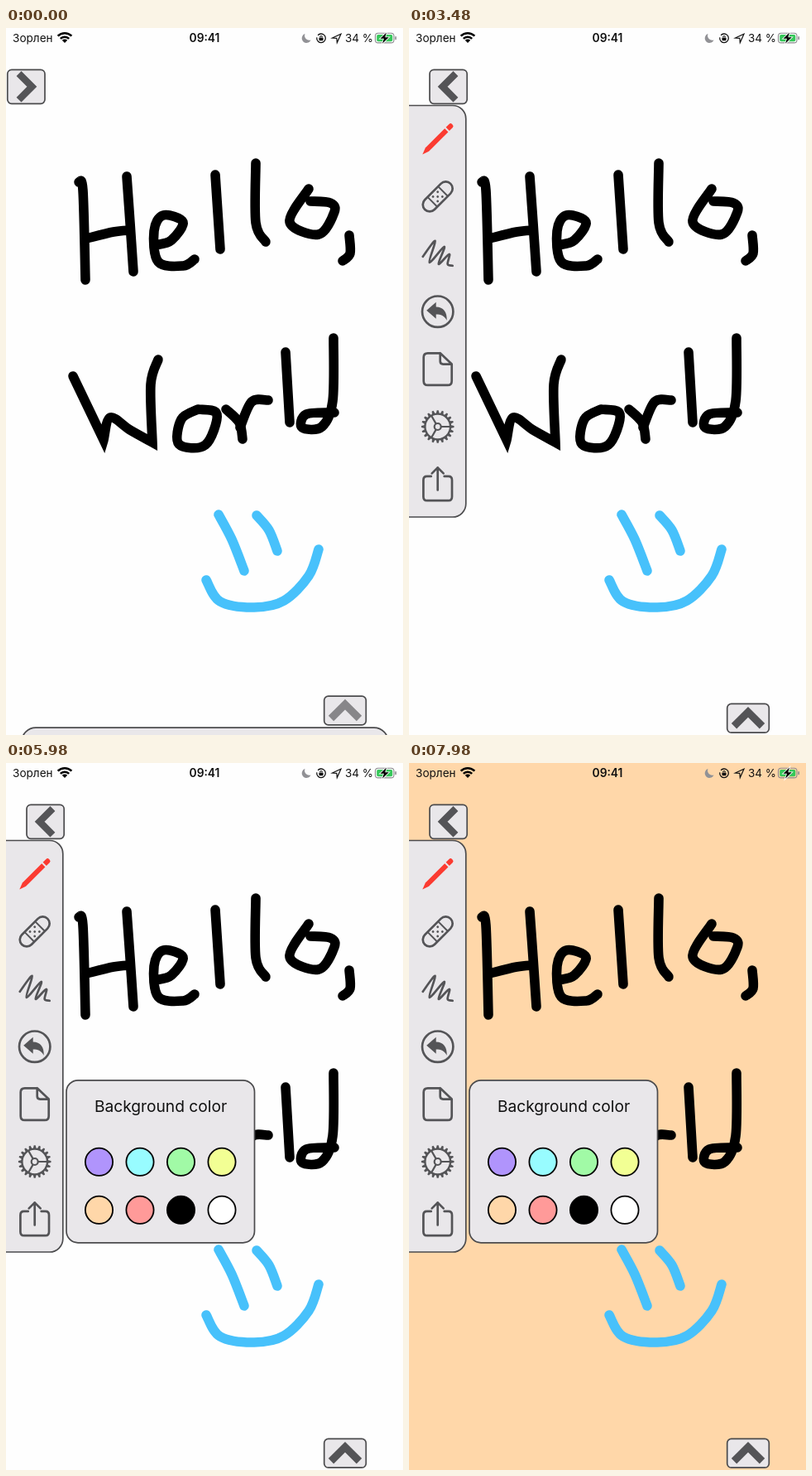
An HTML page with a canvas that plays this animation: 480 px wide and 853 px high, repeating every 8 s.

```html
<!DOCTYPE html>
<html lang="en">
<head>
<meta charset="utf-8">
<title>Drawing app</title>
<style>
html, body { margin: 0; width: 100%; height: 100%; overflow: hidden; background: #fefefe; }
canvas { display: block; width: 480px; height: 853px; }
</style>
</head>
<body>
<canvas id="stage"></canvas>
<script>
const W = 480, H = 853, LOOP = 8000, TAU = Math.PI * 2;
const INK = '#545457', PANEL = '#e9e7ea', EDGE = '#4b4b4d';
const FONT = 'Inter, Roboto, sans-serif';
const YELLOW = '#f2ff94', ORANGE = '#ffd7a9', WHITE = '#fefefe';
const SWATCHES = ['#b094fc', '#98fcff', '#a1faa6', YELLOW, ORANGE, '#ff9a99', '#000', '#fff'];

const canvas = document.getElementById('stage');
const ctx = canvas.getContext('2d');
const dpr = window.devicePixelRatio || 1;
canvas.width = W * dpr;
canvas.height = H * dpr;

const clamp = v => Math.min(1, Math.max(0, v));
const easeInOut = p => p < .5 ? 2 * p * p : 1 - 2 * (1 - p) ** 2;
const progress = (t, start, length) => easeInOut(clamp((t - start) / length));

function stroke(shape, color = INK, width = 2.7) {
  ctx.strokeStyle = color;
  ctx.lineWidth = width;
  ctx.stroke(shape);
}

function fill(shape, color) {
  ctx.fillStyle = color;
  ctx.fill(shape);
}

function at(x, y, draw) {
  ctx.save();
  ctx.translate(x, y);
  draw();
  ctx.restore();
}

function arc(x, y, r, from = 0, to = TAU) {
  const p = new Path2D();
  p.arc(x, y, r, from, to);
  return p;
}

function box(x, y, w, h, r) {
  const p = new Path2D();
  p.roundRect(x, y, w, h, r);
  return p;
}

function panel(x, y, w, h, r) {
  const p = box(x, y, w, h, r);
  fill(p, PANEL);
  stroke(p, EDGE, 1.7);
}

function label(text, x, y, size, weight = 400, align = 'left') {
  ctx.font = `${weight} ${size}px ${FONT}`;
  ctx.textAlign = align;
  ctx.fillStyle = '#111';
  ctx.fillText(text, x, y);
}

// Smooth curve through key points; a repeated point makes a sharp corner
function curve(text) {
  const pts = text.split(' ').map(s => s.split(',').map(Number));
  const path = new Path2D();
  path.moveTo(...pts[0]);
  for (let i = 1; i < pts.length; i++) {
    const b = pts[i - 1], c = pts[i], a = pts[i - 2] || b, d = pts[i + 1] || c;
    if (b[0] === c[0] && b[1] === c[1]) continue;
    path.bezierCurveTo(
      b[0] + (c[0] - a[0]) / 6, b[1] + (c[1] - a[1]) / 6,
      c[0] - (d[0] - b[0]) / 6, c[1] - (d[1] - b[1]) / 6, ...c);
  }
  return path;
}

const letters = {
  H: ['88,186 93,196 96,304', '146,179 150,235 154,294', '97,254 130,246 150,244'],
  e: ['181,262 200,256 214,234 190,226 179,245 184,282 214,287 228,279'],
  ll: ['253,177 259,267', '302,163 302,235 314,258'],
  o: ['366,194 343,234 378,249 397,222 392,211 368,209'],
  comma: ['415,250 416,272 407,281'],
  W: ['81,420 118,497 118,497 126,470 150,485 177,500 177,500 175,430 184,400'],
  or: ['232,460 212,472 209,502 241,503 255,466 232,460', '266,460 282,476 286,496', '283,482 297,451 317,449'],
  ld: ['338,391 343,476', '396,374 395,450 382,481 358,482 363,466 397,464']
};
const face = ['257,587 273,617 288,655', '303,588 318,606 328,631', '242,666 259,692 300,699 336,691 366,661 378,629'];

const drawing = [
  ...Object.values(letters).flat().map(s => [curve(s), '#000']),
  ...face.map(s => [curve(s), '#47c1fb'])
];

function handwriting() {
  ctx.save();
  ctx.lineCap = 'round';
  ctx.lineJoin = 'miter';
  ctx.miterLimit = 5;
  for (const [path, color] of drawing) stroke(path, color, 11.6);
  ctx.restore();
}

function statusBar() {
  label('Зорлен', 8, 17, 13.6);
  label('09:41', 240, 17, 13.8, 600, 'center');
  label('34 %', 410, 17, 13.4);

  for (const r of [7.3, 11.8])
    stroke(arc(71, 18, r, -TAU * 3 / 8, -TAU / 8), '#000', 2.6);
  fill(new Path2D('M71 18L67.8 14.8A4.5 4.5 0 0 1 74.2 14.8Z'), '#000');

  fill(new Path2D('M361.5 7A5.6 5.6 0 1 0 368.5 14.4A5.6 5.6 0 0 1 361.5 7Z'), '#929296');

  stroke(arc(381, 12.3, 5.3, -2.4, 3.3), '#111', 1.3);
  fill(box(378.5, 11.5, 5, 3.8, .7), '#111');
  stroke(arc(381, 11, 1.4, Math.PI, TAU), '#111', 1);
  stroke(new Path2D('M394.5 12L405 7.2L400.3 17.6L399.8 12.4Z'), '#111', 1.2);

  stroke(box(446.5, 6.3, 22.5, 11.6, 3.4), '#8b8b8e', 1.1);
  fill(box(448.2, 8, 19.1, 8.2, 1.8), '#35c759');
  fill(box(470.4, 10, 1.6, 4.2, .8), '#8b8b8e');
  const bolt = new Path2D('M460 5.5L452.5 12.8H457L455 18.8L462.8 11.2H458.3Z');
  stroke(bolt, '#fff', 1.6);
  fill(bolt, '#000');
}

function chevron(angle, scale, alpha) {
  ctx.save();
  ctx.globalAlpha = alpha;
  ctx.lineCap = 'butt';
  ctx.lineJoin = 'miter';
  ctx.rotate(angle);
  ctx.scale(scale, scale);
  stroke(new Path2D('M-9.5 -17L7.5 0L-9.5 17'), INK, 9);
  ctx.restore();
}

function bottomPanel(t) {
  // Tail end of the sheet sliding down off the stage
  const left = clamp(1 - Math.max(0, t - 50) / 90) ** 2;
  if (left > 0) panel(19, 853.5 - 9.3 * left, 443, 240, 17);
  at(410, 832.8 - 9.3 * left, () => {
    panel(-25.3, -17.4, 50.6, 34.8, 5);
    chevron(-TAU / 4, 1, 1 - .35 * left);
  });
}

const pencil = () => {
  ctx.rotate(-TAU / 8);
  fill(new Path2D('M-26 0L-18 -3H15V3H-18Z'), '#fb3b31');
  fill(box(17, -3, 8, 6, [0, 2.5, 2.5, 0]), '#fb3b31');
};

const bandage = () => {
  ctx.rotate(-TAU / 8);
  stroke(box(-22, -8.3, 44, 16.6, 8.3));
  stroke(new Path2D('M-9 -8V8M9 -8V8'), INK, 2);
  fill(arc(0, 0, 1.4), INK);
  for (let i = 0; i < 4; i++) {
    ctx.rotate(TAU / 4);
    fill(arc(4, 4, 1.4), INK);
  }
};

const scribble = () => stroke(curve('-18,3 -3,-16 -10,10 8,-9 1,12 14,0 12,12 18,14'));

const undo = () => {
  stroke(arc(0, 0, 18.7));
  fill(new Path2D('M-13.5 -1.5L-2 -11.5V-5.8C7 -5.8 11.5 .5 11 10.5C8 5 4 3.4 -2 3.4V8.5Z'), INK);
};

const page = () => {
  const outline = new Path2D('M3 -19.3V-9.5Q3 -6 6.5 -6H17L3 -19.3');
  outline.addPath(new Path2D('M3 -19.3H-12Q-17 -19.3 -17 -14.3V14.3Q-17 19.3 -12 19.3H12Q17 19.3 17 14.3V-6'));
  stroke(outline);
};

const gear = () => {
  stroke(arc(0, 0, 15.3), INK, 2.3);
  stroke(arc(0, 0, 4), INK, 2.2);
  for (let i = 0; i < 20; i++) {
    ctx.rotate(TAU / 20);
    fill(new Path2D('M15.5 -2L19.8 -1V1L15.5 2Z'), INK);
  }
  for (let i = 0; i < 3; i++) {
    stroke(new Path2D('M4.5 0H15'), INK, 2.2);
    ctx.rotate(TAU / 3);
  }
};

const share = () => stroke(new Path2D('M-8 -9.5H-13Q-17.3 -9.5 -17.3 -5V15Q-17.3 19.7 -13 19.7' +
  'H13Q17.3 19.7 17.3 15V-5Q17.3 -9.5 13 -9.5H8M0 7V-20M-7 -13L0 -20L7 -13'));

const tools = [pencil, bandage, scribble, undo, page, gear, share];

function sidebar(open) {
  if (open > 0) at(-72 * (1 - open), 0, () => {
    panel(-30, 93.5, 98.8, 496.5, 16);
    ctx.lineCap = ctx.lineJoin = 'round';
    tools.forEach((icon, i) => at(34.7, 134 + 69.4 * i, icon));
  });
  at(24.4 + 23.2 * open, 70.8, () => {
    panel(-22.6, -20.5, 45.2, 41, 5);
    chevron(0, .93, 1 - open);
    chevron(TAU / 2, .93, open);
  });
}

function popup(open) {
  if (open > 0) at(-232 * (1 - open), 0, () => {
    panel(73, 382.8, 227.5, 196, 14);
    label('Background color', 187, 421, 19.2, 400, 'center');
    SWATCHES.forEach((color, i) => {
      const dot = arc(112.5 + 49.5 * (i % 4), 481.3 + 58 * (i >> 2), 16.6);
      fill(dot, color);
      stroke(dot, '#000', 1.8);
    });
  });
}

function render(t) {
  ctx.setTransform(dpr, 0, 0, dpr, 0, 0);
  ctx.fillStyle = t < 6250 ? WHITE : t < 7750 ? YELLOW : ORANGE;
  ctx.fillRect(0, 0, W, H);
  handwriting();
  statusBar();
  bottomPanel(t);
  popup(progress(t, 4353, 300));
  sidebar(progress(t, 2100, 300));
}

const began = performance.now();
function tick() {
  render((performance.now() - began) % LOOP);
  requestAnimationFrame(tick);
}
tick();
</script>
</body>
</html>
```
